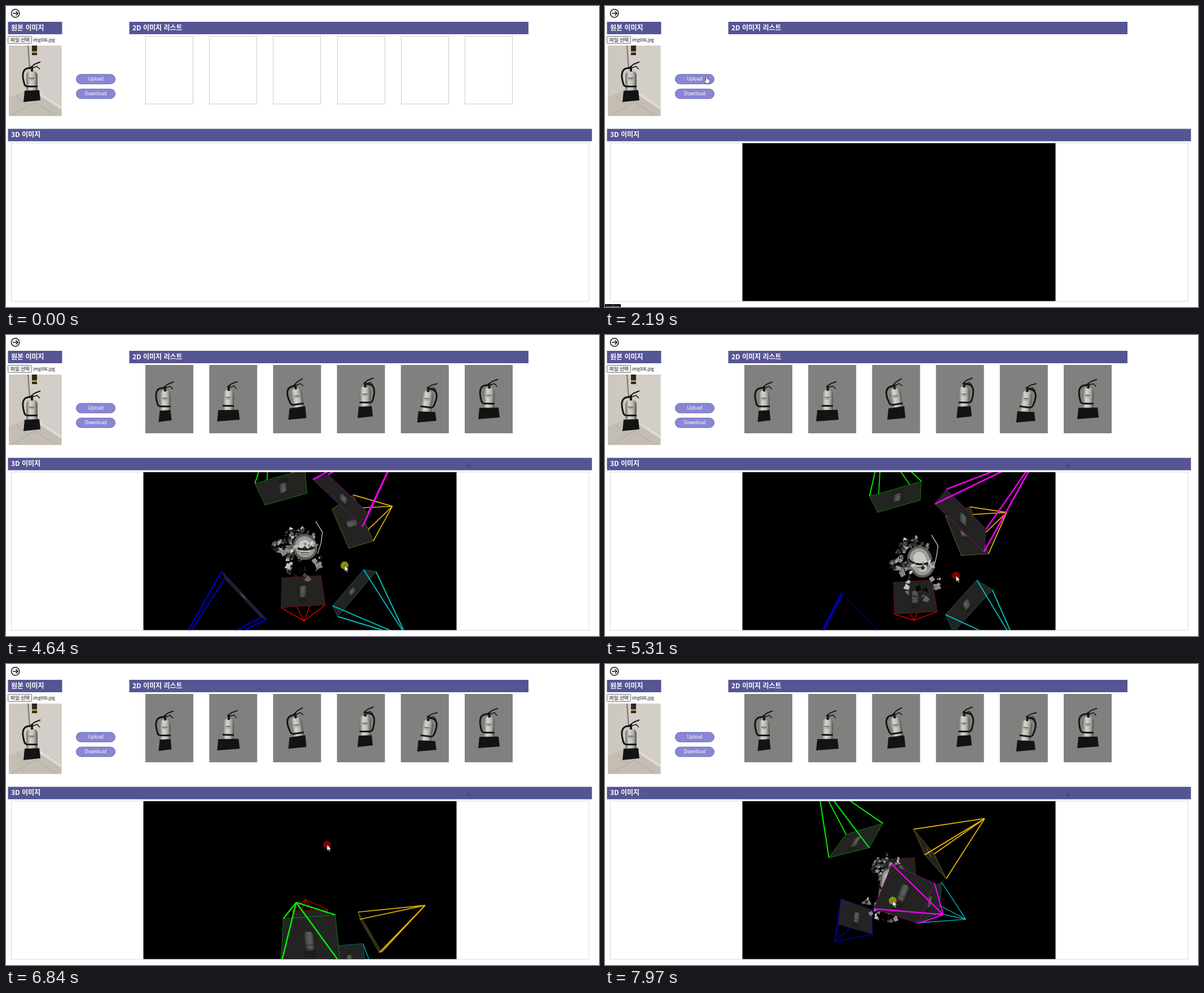
Animation, 1051 px wide and 533 px high, one loop 8 s. Source, as an HTML page with a canvas:

```html
<!DOCTYPE html>
<html lang="ko">
<head>
<meta charset="utf-8">
<title>2D / 3D 이미지</title>
<style>
  html, body { margin: 0; width: 100%; height: 100%; overflow: hidden; background: #fff; }
  canvas, svg { position: absolute; left: 0; top: 0; width: 1051px; height: 533px; }
  text { font-family: "Noto Sans CJK KR", "Noto Sans CJK JP", "Noto Sans", sans-serif; }
  .head { font-size: 12px; font-weight: 700; fill: #fff; }
  .button { font: 8.1px "Noto Sans", sans-serif; fill: #fff; text-anchor: middle; }
</style>
</head>
<body>
<canvas id="stage" width="1051" height="533"></canvas>
<svg viewBox="0 0 1051 533">
  <g fill="none" stroke="#111" stroke-width="1.5">
    <circle cx="16.6" cy="13" r="7.2"/>
    <path d="M12 13h9M17.5 9.3l3.7 3.7l-3.7 3.7"/>
  </g>
  <text class="head" x="9" y="42.5">원본 이미지</text>
  <text class="head" x="224" y="42.5">2D 이미지 리스트</text>
  <text class="head" x="9" y="232">3D 이미지</text>
  <text x="8" y="63" font-size="8.5" fill="#222">파일 선택</text>
  <text x="48" y="63" font-size="7.5" fill="#111">img006.jpg</text>
  <text class="button" x="159" y="132.2">Upload</text>
  <text class="button" x="159" y="158.2">Download</text>
  <g id="status">
    <rect y="528" width="28" height="6"/>
    <text x="2" y="535" font-size="6.5" fill="#fff">loading</text>
  </g>
  <g id="cursor">
    <circle id="press" r="7"/>
    <path id="arrow" d="M0 0V10.5L2.5 8.3L4.2 12L5.9 11.2L4.3 7.7H7.5Z" fill="#fff" stroke="#222" stroke-width=".8"/>
    <path id="hand" d="M-1.2 8V1Q0-1 1.2 1V5Q2.5 4 3 5.500Q4.5 5 4.6 6.5Q6 6 5.8 8L4.8 13H-1.500L-4.300 8.500Q-3 6.500 -1.2 8Z" fill="#fff" stroke="#222" stroke-width=".8"/>
  </g>
</svg>
<script>
const LOOP = 8000;
const ctx = document.getElementById("stage").getContext("2d");
const part = id => document.getElementById(id);
const show = (id, on) => { part(id).style.display = on ? "" : "none"; };

// Linear interpolation over rows of [time, ...values].
function along(rows, t) {
  const next = rows.findIndex(row => row[0] > t);
  if (next === 0) return rows[0].slice(1);
  if (next < 0) return rows[rows.length - 1].slice(1);
  const from = rows[next - 1], to = rows[next];
  const k = (t - from[0]) / (to[0] - from[0]);
  return from.slice(1).map((v, i) => v + (to[i + 1] - v) * k);
}

function seeded(seed) {
  return () => (seed = seed * 16807 % 2147483647) / 2147483647;
}

function fill(color, x, y, w, h) {
  ctx.fillStyle = color;
  ctx.fillRect(x, y, w, h);
}

function frame(color, x, y, w, h) {
  ctx.strokeStyle = color;
  ctx.lineWidth = 1;
  ctx.strokeRect(x, y, w, h);
}

function pill(x, y, w, h, r, color, edge) {
  ctx.beginPath();
  ctx.roundRect(x, y, w, h, r);
  ctx.fillStyle = color;
  ctx.fill();
  ctx.strokeStyle = edge;
  ctx.lineWidth = 1;
  ctx.stroke();
}

function trace(points) {
  ctx.beginPath();
  points.forEach(([x, y]) => ctx.lineTo(x, y));
}

function poly(points, color) {
  trace(points);
  ctx.closePath();
  ctx.fillStyle = color;
  ctx.fill();
}

function line(points, color, width) {
  trace(points);
  ctx.strokeStyle = color;
  ctx.lineWidth = width;
  ctx.stroke();
}

// Centred on the bottle; side puts the hose left (-1) or right (1).
function extinguisher(x, y, tilt, base, side = -1) {
  const metal = ctx.createLinearGradient(-10, 0, 10, 0);
  ["#70706a", "#d6d6cf", "#b9b9b1", "#55554f"].forEach((c, i) => metal.addColorStop(i / 3, c));
  ctx.save();
  ctx.translate(x, y);
  ctx.save();
  ctx.rotate(tilt);
  ctx.beginPath();
  ctx.moveTo(0, -24);
  ctx.bezierCurveTo(side * 18, -26, side * 18, -12, side * 14, 2);
  ctx.quadraticCurveTo(side * 13, 9, side * 7, 8);
  ctx.strokeStyle = "#141414";
  ctx.lineWidth = 3;
  ctx.stroke();
  ctx.beginPath();
  ctx.roundRect(-10, -20, 20, 40, [9, 9, 2, 2]);
  ctx.fillStyle = metal;
  ctx.fill();
  fill("#161616", -10, 7, 20, 3);
  fill("#55554f", -5, -7, 9, 1.5);
  fill("#85857f", -4, -4, 7, 1);
  line([[0, -18], [0, -27]], "#1a1a1a", 4);
  line([[-3, -25], [5, -31], [15, -35]], "#1a1a1a", 2);
  line([[0, -24], [9, -27], [14, -22]], "#1a1a1a", 1.6);
  ctx.restore();
  const half = base / 2;
  poly([[-half + 2, 16], [half - 2, 15 + tilt * 20], [half, 33], [-half, 36]], "#131313");
  ctx.restore();
}

function photo() {
  ctx.save();
  ctx.beginPath();
  ctx.rect(5, 70, 93.5, 124.5);
  ctx.clip();
  fill("#cdc9c1", 5, 70, 94, 125);
  fill("#d3cfc8", 42, 70, 57, 125);
  poly([[5, 162], [34, 150], [60, 156], [98, 182], [98, 195], [5, 195]], "#c4bdb3");
  line([[60, 156], [98, 181]], "#e0dcd5", 4);
  line([[10, 194], [52, 170], [88, 194]], "#a79e92", .8);
  line([[18, 158], [40, 178]], "#a79e92", .8);
  line([[39, 70], [42, 112]], "#77736c", 2);
  fill("#2d2820", 46, 70, 9, 17);
  fill("#bd9840", 46, 80, 9, 3);
  extinguisher(46, 134, 0, 30);
  ctx.restore();
}

// Per picture: bottle x and y, tilt, width of the base, hose side.
const shots = [
  [35, 65, 0, 23], [34, 64, .03, 40, 0], [43, 61, -.15, 32],
  [50, 58, 0, 27, 1], [46, 66, .12, 34, 1], [43, 60, .03, 38]
];

function thumbnails(loaded) {
  shots.forEach(([x, y, ...look], i) => {
    const left = 247 + i * 113.2;
    if (!loaded) return frame("#ccc", Math.round(left) + .5, 53.5, 84, 120);
    fill("#80807f", left, 53, 85, 121);
    extinguisher(left + x, 53 + y, ...look);
  });
}

// Camera positions around the model: right, down, towards the viewer.
const cameras = [
  ["#0000c0", [-.72, .67, .4]],
  ["#d80000", [.05, .8, -.75]],
  ["#00bcbc", [.76, .65, .07]],
  ["#e6b60a", [.85, -.37, -.38]],
  ["#00f000", [-.26, -.92, -.28]],
  ["#f000f0", [.55, -.58, .5]]
];

// Orbit: time, pan x, pan y, scale, pitch and yaw in degrees.
const orbit = [
  [3900, 6, 127, 220, 25, 0],
  [4640, -1, -10, 240, 0, 0],
  [4850, -1, -10, 240, 0, 0],
  [5310, 28, 14, 240, 6, 0],
  [5650, 32, 75, 235, 8, 0],
  [6840, 30, 141, 205, 70, 7],
  [7710, -26, 7, 192, 60, -13]
];
const EYE = 380;

// Returns a function from a model point to [x, y, depth, magnification].
function projector(t) {
  const [panX, panY, scale, ...degrees] = along(orbit, t);
  const [pitch, yaw] = degrees.map(d => d * Math.PI / 180);
  return ([x, y, z]) => {
    const down = y * Math.cos(pitch) + z * Math.sin(pitch);
    const near = z * Math.cos(pitch) - y * Math.sin(pitch);
    const right = x * Math.cos(yaw) + near * Math.sin(yaw);
    const depth = (near * Math.cos(yaw) - x * Math.sin(yaw)) * scale;
    const zoom = EYE / (EYE - depth);
    return [521 + (right * scale + panX) * zoom, 383 + (down * scale + panY) * zoom, depth, zoom * scale / 240];
  };
}

const unit = v => v.map(c => c / Math.hypot(...v));
const cross = ([a, b, c], [d, e, f]) => [b * f - c * e, c * d - a * f, a * e - b * d];

// Picture plane halfway to the model, facing it, with its top along the bottle's axis.
function plane(position) {
  const normal = unit(position);
  const right = unit(cross([0, 0, -1], normal));
  const up = cross(normal, right);
  return [[-1, 1], [1, 1], [1, -1], [-1, -1]].map(([h, v]) =>
    position.map((c, i) => c / 2 + right[i] * h * .19 + up[i] * v * .165));
}

function frustum(color, position, project) {
  const tip = project(position);
  const corners = plane(position).map(project);
  const [a, b, , d] = corners;
  const over = tip[2] > project(position.map(c => c / 2))[2];
  const rays = () => corners.forEach(corner =>
    line([tip, corner], color, Math.min(3, 1.9 * (tip[3] + corner[3]) / 2)));
  if (!over) rays();
  poly(corners, "#232322");
  ctx.save();
  ctx.transform((b[0] - a[0]) / 120, (b[1] - a[1]) / 120, (d[0] - a[0]) / 100, (d[1] - a[1]) / 100, a[0], a[1]);
  ctx.globalAlpha = .32;
  extinguisher(66, 50, 0, 28);
  ctx.restore();
  ctx.globalAlpha = .45;
  line([...corners, a], color, 1);
  ctx.globalAlpha = 1;
  if (over) rays();
}

// Torn surface pieces scattered in a flat ring around a centre.
function shards(project, random, count, [cx, cy, cz], radius) {
  for (let i = 0; i < count; i++) {
    const angle = random() * Math.PI * 2, reach = radius * (.5 + random() * .5);
    const [x, y, , zoom] = project([
      cx + Math.cos(angle) * reach, cy + Math.sin(angle) * reach, cz + (random() - .5) * radius]);
    const shade = Math.floor(random() * 215);
    const points = [0, 1, 2, 3].map(k => {
      const turn = angle + k * 1.6, size = (1 + random() * 6) * zoom;
      return [x + Math.cos(turn) * size, y + Math.sin(turn) * size];
    });
    poly(points, `rgb(${shade},${shade},${shade})`);
  }
}

function model(project) {
  const random = seeded(71);
  const top = project([.04, 0, -.08]), bottom = project([.04, .02, .16]);
  const r = 19 * bottom[3];
  shards(project, random, 75, [0, -.01, -.17], .15);
  ctx.lineCap = "round";
  [["#5c5c58", 2], ["#9c9c96", 1.6], ["#c9c9c2", 1]].forEach(([color, width]) =>
    line([top, bottom], color, r * width));
  ctx.lineCap = "butt";
  const x = (top[0] + bottom[0]) / 2, y = (top[1] + bottom[1]) / 2;
  ctx.beginPath();
  ctx.ellipse(x, y - 6, r, r * .5, 0, .1, Math.PI - .1);
  ctx.strokeStyle = "#161616";
  ctx.lineWidth = 3.5;
  ctx.stroke();
  fill("#3c3c39", x - 7, y + 9, 14, 1.5);
  fill("#666661", x - 6, y + 12, 12, 1);
  shards(project, random, 32, [.03, .09, .23], .13);
  shards(project, random, 14, [-.14, .01, .18], .035);
  line([[.12, -.18, 0], [.17, -.1, 0], [.16, -.02, 0], [.13, .06, .05]].map(project), "#aaa", 1.6);
}

function viewer(t) {
  ctx.save();
  ctx.beginPath();
  ctx.rect(243.5, 243, 555, 279.5);
  ctx.clip();
  fill("#000", 243, 243, 556, 280);
  if (t >= 2500) {
    const project = projector(t);
    const items = cameras.map(([color, position]) => ({
      depth: project(position.map(c => c / 2))[2],
      draw: () => frustum(color, position, project)
    }));
    items.push({ depth: 0, draw: () => model(project) });
    items.sort((a, b) => a.depth - b.depth).forEach(item => item.draw());
  }
  ctx.restore();
}

const pointer = [
  [70, 1045, 530], [870, 376, 163], [1300, 180, 124], [2650, 180, 124],
  [3310, 680, 132], [3600, 868, 150], [3750, 820, 225], [3950, 640, 330],
  [4640, 600, 408], [4850, 600, 408], [5310, 622, 426], [5650, 640, 470],
  [6840, 569, 320], [7710, 510, 419]
];
// Orbit drags and pan drags alternate.
const drags = [[3950, 4720], [4900, 5650], [5750, 6510], [6580, 7380], [7440, LOOP]];

function moveCursor(t) {
  const [x, y] = along(pointer, t);
  const hand = t > 1250 && t < 2700;
  const drag = drags.findIndex(([from, to]) => t >= from && t < to);
  show("cursor", t >= 70);
  show("hand", hand);
  show("arrow", !hand);
  show("press", drag >= 0);
  part("press").setAttribute("fill", drag % 2 ? "#850000" : "#8c8a10");
  part("cursor").setAttribute("transform", `translate(${x} ${y})`);
}

function draw(t) {
  fill("#fff", 0, 0, 1051, 533);
  const bar = "#555594";
  fill(bar, 3.5, 28, 96, 22);
  fill(bar, 218.5, 28, 707.5, 22);
  fill(bar, 3.5, 217.5, 1035, 22);
  pill(3.5, 53.5, 42, 13, 1, "#efefef", "#777");
  [121, 147].forEach(y => pill(124.5, y, 69, 17, 8.5, "#8987d3", "#6866b8"));
  photo();
  frame("#d8d8d8", 9.5, 242.5, 1023.5, 280.5);
  if (t < 1870 || t >= 2300) thumbnails(t >= 2300);
  if (t >= 1870) viewer(t);
  if (t >= 3750) {
    ctx.beginPath();
    ctx.arc(820, 231.5, 3.5, 0, 7);
    ctx.fillStyle = "#4b4b7c";
    ctx.fill();
  }
  show("status", t >= 1350 && t < 2760);
  moveCursor(t);
}

function tick() {
  draw(performance.now() % LOOP);
  requestAnimationFrame(tick);
}
tick();
</script>
</body>
</html>
```
